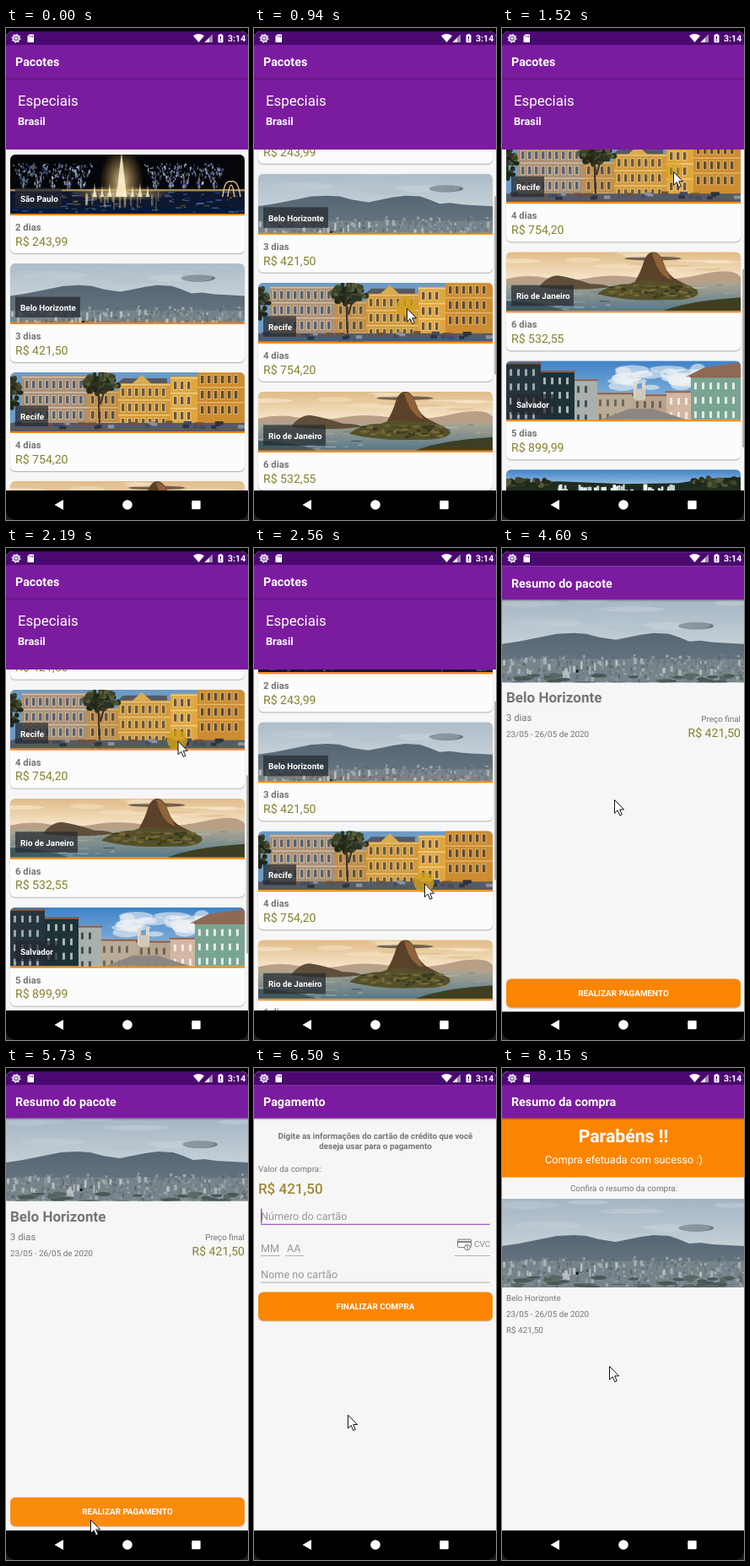
Animation, 287 px wide and 583 px high, one loop 8.17 s. Source, as an HTML page:

```html
<!DOCTYPE html>
<html lang="pt-BR">
<head>
<meta charset="utf-8">
<title>Pacotes</title>
<style>
html, body { margin: 0; width: 100%; height: 100%; overflow: hidden; background: #1c1c1c; }
svg#stage { display: block; width: 100vw; height: 100vh; }
text { font-family: Roboto, "Noto Sans", sans-serif; text-rendering: geometricPrecision; white-space: pre; }
</style>
</head>
<body>
<svg id="stage" viewBox="0 0 287 583" xmlns="http://www.w3.org/2000/svg"></svg>
<script>
const LOOP = 8170;
const PURPLE = '#7b1b9f', DARK = '#4a0a70', ORANGE = '#fb8500', GREY = '#757575', OLIVE = '#85802f', PAGE = '#f6f6f6';
const $ = id => document.getElementById(id);

// Markup helpers
const rect = (x, y, w, h, fill, more = '') => `<rect x="${x}" y="${y}" width="${w}" height="${h}" fill="${fill}" ${more}/>`;
const path = (d, fill, more = '') => `<path d="${d}" fill="${fill}" ${more}/>`;
const line = (d, stroke, w = 1, more = '') => path(d, 'none', `stroke="${stroke}" stroke-width="${w}" ${more}`);
const oval = (x, y, rx, ry, fill, more = '') => `<ellipse cx="${x}" cy="${y}" rx="${rx}" ry="${ry}" fill="${fill}" ${more}/>`;
const text = (x, y, s, size, fill, weight = 400, anchor = 'start') =>
  `<text x="${x}" y="${y}" font-size="${size}" fill="${fill}" font-weight="${weight}" text-anchor="${anchor}">${s}</text>`;
const stops = list => list.map((c, i) => `<stop offset="${i / (list.length - 1)}" stop-color="${c}"/>`).join('');
const grad = (id, ...list) => `<linearGradient id="${id}" x2="0" y2="1">${stops(list)}</linearGradient>`;
const many = (n, f) => Array.from({ length: n }, (_, i) => f(i)).join('');
let seed = 7;
const rnd = (a = 0, b = 1) => {
  seed = (seed * 16807) % 2147483647;
  return +(a + (b - a) * seed / 2147483647).toFixed(1);
};
const pick = list => list[Math.floor(rnd(0, list.length - .01))];
const photo = (id, w, h, body) => `<symbol id="${id}" viewBox="0 0 ${w} ${h}" preserveAspectRatio="xMidYMid slice">${body}</symbol>`;
const windows = (x, y, cols, rows, dx, dy, fill, w = 3, h = 6) =>
  many(cols * rows, i => rect(x + i % cols * dx, y + Math.floor(i / cols) * dy, w, h, fill));
const leaves = (x, y, rx, ry, n) => many(n, () => {
  const a = rnd(0, 6.3), r = Math.sqrt(rnd());
  return oval(x + rx * r * Math.cos(a), y + ry * r * Math.sin(a), rnd(2, 5), rnd(2, 4), pick(['#2c3320', '#3d452a', '#212718', '#565a35']));
});

// Softly drawn landscapes
const litTree = x => many(52, () => {
  const a = rnd(-1.4, 1.4), r = rnd(4, 32);
  return rect(x + r * .42 * Math.sin(a), 42 - r, rnd(.8, 2), rnd(1, 4), pick(['#3f5688', '#93a5c8', '#5f759f', '#cdd6e6', '#6d7488']), 'opacity=".8"');
}) + line(`M${x} 45V26`, '#aab4c8', .8);
const jet = (x, top, w) => path(`M${x - w} 50Q${x - w / 3} ${top + 14} ${x} ${top}Q${x + w / 3} ${top + 14} ${x + w} 50Z`, '#fff3cf', 'opacity=".85"');
const night = rect(0, 0, 278, 70, '#05060a') +
  [16, 32, 50, 68, 84, 172, 190, 206, 224, 242].map(litTree).join('') +
  oval(132, 32, 26, 40, 'url(#glow)') + rect(0, 42, 278, 28, '#0d1730') + rect(0, 41, 278, 2.4, '#a58a58') +
  many(110, () => rect(rnd(-4, 274), rnd(44, 68), rnd(2, 9), rnd(.7, 1.6), pick(['#2a4a86', '#5c5034', '#16264f', '#86713f', '#0a0f1e', '#4565a0']))) +
  oval(132, 46, 62, 9, 'url(#glow)') + many(24, () => rect(rnd(88, 178), rnd(44, 50), rnd(1, 3), rnd(6, 18), '#e6cd90', 'opacity=".4"')) +
  jet(132, -2, 6) + many(8, i => jet(100 + i * 9, 33 + i % 2 * 3, 3)) +
  line('M252 50Q254 29 262 32Q270 29 273 50M258 50Q262 22 266 50', '#e9c685', 1.4);

const hills = rect(0, 0, 287, 105, 'url(#haze)') +
  many(18, () => oval(rnd(0, 287), rnd(3, 38), rnd(14, 40), rnd(2, 5), pick(['#cfd6db', '#aebdc9', '#c4ced6']), 'opacity=".4"')) +
  path('M0 56L20 53L45 48L65 44L85 43L100 44L115 48L135 51L150 48L165 45L180 43L198 44L210 48L222 53L235 52L250 54L287 56V90H0Z', 'url(#ridge)') +
  rect(0, 74, 287, 31, '#76838a') +
  many(420, () => rect(rnd(-2, 286), rnd(68, 103), rnd(1, 4), rnd(1, 5), pick(['#95a0a6', '#7d898f', '#a9b1b4', '#66737a', '#58666b', '#8a9499']), 'opacity=".85"')) +
  many(40, () => rect(rnd(0, 284), rnd(72, 92), rnd(2, 4), rnd(5, 10), pick(['#a6afb3', '#87939a', '#b9bfc0']))) +
  many(40, () => oval(rnd(0, 287), rnd(92, 106), rnd(4, 11), rnd(1, 3), pick(['#4b5856', '#5a6763'])));

const facade = (x, y, w, wall, trim, win) => rect(x, y, w, 64 - y, wall) +
  many(3, i => rect(x, y + 1 + i * 18, w, 1.6, trim)) +
  windows(x + 3, y + 5, Math.floor((w - 3) / 8), 3, 8, 18, trim, 5.4, 11) +
  windows(x + 4, y + 6, Math.floor((w - 3) / 8), 3, 8, 18, win, 3.4, 9);
const town = rect(0, 0, 278, 70, '#6d9bc6') + facade(14, 4, 78, '#ad8f72', '#cbbfae', '#57616e') +
  facade(92, 22, 36, '#c08f48', '#d3b27c', '#5d5140') +
  path('M126 14L134 7H186V14Z', '#565964') + facade(128, 13, 62, '#d29a3c', '#e8c57c', '#6b573d') +
  path('M144 14L156 3L168 14Z', '#dbab51') +
  facade(190, 5, 32, '#e0a63f', '#f0cd84', '#695540') + facade(222, -2, 56, '#cd8c30', '#e2b568', '#5f4b38') +
  rect(0, 60, 278, 10, '#545a66') + many(26, () => rect(rnd(0, 270), rnd(57, 64), rnd(5, 11), 4, pick(['#2e333c', '#8f9299', '#6a5140', '#3f4c63']))) +
  leaves(3, 24, 9, 18, 40) + leaves(106, 13, 22, 12, 80) + line('M104 16L106 60M112 20L107 38', '#3b2e24', 2);

const bay = rect(0, 0, 278, 70, 'url(#dusk)') +
  many(14, () => oval(rnd(0, 278), rnd(2, 22), rnd(14, 40), rnd(1, 3), pick(['#fdf2de', '#dcb98a', '#f7e5c8']), 'opacity=".5"')) +
  path('M0 32Q25 26 48 31T104 30Q130 26 160 31T230 27T278 30V42H0Z', '#b99f86') +
  rect(0, 37, 278, 33, 'url(#water)') +
  many(70, () => rect(rnd(-8, 270), rnd(38, 68), rnd(4, 18), rnd(.6, 1.6), pick(['#c9c5b5', '#4f7080', '#a9a58f', '#6f858a']), 'opacity=".55"')) +
  path('M40 40Q50 28 61 28Q80 31 100 38Q118 38 124 42Q80 47 40 42Z', '#5f4e39') +
  path('M150 40Q160 24 164 9Q168 0 175 0Q183 1 187 14Q191 28 204 34L228 46Q180 54 146 47Z', '#5a4129') +
  path('M173 1Q184 2 187 16L196 33Q180 29 173 1Z', '#8f6238') +
  path('M108 50Q122 38 146 38Q164 30 186 36Q212 34 228 48Q226 58 190 57Q142 59 108 50Z', '#54502a') +
  many(60, () => oval(rnd(124, 218), rnd(40, 54), rnd(2, 6), rnd(1, 2), pick(['#42431f', '#68602f', '#7a6938', '#35381d']))) +
  path('M186 70Q216 58 278 54V70Z', '#3e3f22') + path('M0 70V58Q44 60 70 70Z', '#3f5a60');

const house = (x, y, w, fill, win) => rect(x, y, w, 70 - y, fill) + rect(x - 1, y, w + 2, 2, '#8f6048') +
  windows(x + 4, y + 8, Math.floor((w - 2) / 9), 4, 9, 17, win, 3, 8);
const street = rect(0, 0, 278, 70, 'url(#day)') +
  many(22, () => oval(rnd(130, 240), rnd(8, 34), rnd(9, 24), rnd(3, 7), '#f1f4f6', 'opacity=".6"')) +
  house(106, 38, 46, '#b9ab95', '#6f665b') + house(150, 40, 48, '#b7a48e', '#716152') +
  rect(151, 25, 4, 20, '#dcd7cc') + rect(161, 25, 4, 20, '#dcd7cc') + rect(153, 33, 11, 14, '#cfc8bb') +
  house(80, 22, 28, '#a9b0ae', '#3f4f52') + house(40, 12, 41, '#1c3236', '#aab5b3') + house(0, 2, 41, '#26343e', '#9da7ac') +
  house(190, 36, 31, '#d3b6a4', '#f2e9df') + house(219, 18, 60, '#78a592', '#e3ebe6') +
  path('M213 19L235 8L278 2V18Z', '#8e6a55') + path('M112 70L146 57H174L214 70Z', '#8b8681');

const falls = rect(0, 0, 278, 70, '#4b8fd6') + rect(0, 0, 278, 22, 'url(#day)') +
  path('M0 11L28 15L62 14L140 17L205 16L236 11L278 9V70H0Z', '#1f2b1f') +
  leaves(22, 16, 30, 4, 40) + leaves(248, 15, 30, 5, 40) +
  many(40, () => line(`M${rnd(58, 204)} ${rnd(17, 24)}v${rnd(24, 44)}`, pick(['#fff', '#dfe8ec', '#c2d1d8']), rnd(2, 5))) +
  oval(140, 68, 88, 9, '#e9eff1', 'opacity=".8"');

// Screens
const appBar = title => rect(0, 4, 287, 16, DARK) + rect(0, 20, 287, 39.6, PURPLE) +
  rect(0, 59.6, 287, 2.6, 'url(#shade)') + text(11, 45.4, title, 14.3, '#fff', 700);
const screen = (id, body, bar) => `<g id="${id}" clip-path="url(#clip-${id})"><g id="${id}-in">` +
  rect(0, 4, 287, 544, PAGE) + rect(0, 548, 287, 60, '#000') + body + bar + '</g></g>';
const button = (id, y, label) => rect(5, y + 1.2, 278, 34, '#000', 'rx="6" opacity=".2"') + rect(5, y, 278, 34, ORANGE, 'rx="6"') +
  rect(5, y, 278, 34, '#fff', `rx="6" id="${id}" opacity="0"`) + text(144, y + 20.4, label, 9.9, '#fff', 600, 'middle');
const view = (id, x, y, w, h) => `<use href="#${id}" x="${x}" y="${y}" width="${w}" height="${h}"/>`;

const trips = [
  ['São Paulo', '2 dias', '243,99', 'night', 44], ['Belo Horizonte', '3 dias', '421,50', 'hills', 66],
  ['Recife', '4 dias', '754,20', 'town', 28], ['Rio de Janeiro', '6 dias', '532,55', 'bay', 63],
  ['Salvador', '5 dias', '899,99', 'street', 42], ['Foz do Iguaçu', '1 dia', '289,90', 'falls', 62]
];
const card = ([city, days, price, img, w], i) => `<g transform="translate(5 ${150 + 129 * i})">` +
  rect(-.4, .8, 278.8, 117.6, '#000', 'rx="6" opacity=".1"') + rect(0, 1, 278, 117, '#000', 'rx="6" opacity=".16"') +
  rect(0, 0, 278, 117, '#fcfcfc', 'rx="6"') +
  `<g clip-path="url(#round)">${view(img, 0, 0, 278, 70)}${rect(0, 70, 278, 2, ORANGE)}</g>` +
  rect(6, 39.5, w + 11, 24.5, '#23292e', 'opacity=".72"') +
  text(12, 56, city, 9.9, '#fff', 600) + text(6, 90, days, 11.3, GREY, 600) + text(6, 107.7, 'R$ ' + price, 14.1, OLIVE) + '</g>';

const list = `<g clip-path="url(#listbox)"><g id="cards">${trips.map(card).join('')}</g>` +
  rect(285.2, 144, 1.8, 211, '#999', 'id="thumb"') + '</g>' + rect(0, 59, 287, 85, PURPLE) +
  text(14, 91.6, 'Especiais', 16.9, '#fff') + text(14, 115.2, 'Brasil', 12.7, '#fff', 700);

const detail = view('hills', 0, 59.6, 287, 98) + text(5, 181.6, 'Belo Horizonte', 17, GREY, 600) +
  text(5, 203.7, '3 dias', 11.3, GREY) + text(5, 222.7, '23/05 - 26/05 de 2020', 9.9, GREY) +
  text(283, 204, 'Preço final', 9.9, GREY, 400, 'end') + text(283, 222, 'R$ 421,50', 14.1, OLIVE, 400, 'end') +
  button('press1', 508.8, 'REALIZAR PAGAMENTO');

const HINT = '#979797';
const rule = (x, y, w, c = '#a6a6a6') => rect(x, y, w, .9, c);
const form = text(144, 83.8, 'Digite as informações do cartão de crédito que você', 9.9, GREY, 600, 'middle') +
  text(144, 95.6, 'deseja usar para o pagamento', 9.9, GREY, 600, 'middle') +
  text(5, 123, 'Valor da compra:', 9.9, GREY) + text(5, 149.4, 'R$ 421,50', 17, '#a08936', 500) +
  text(8, 180, 'Número do cartão', 12.7, HINT) + rect(8, 184.6, 272, 1.3, '#a35fbd') +
  rect(8, 166.5, 1.4, 17.5, '#9c45b5', 'id="caret"') +
  text(8, 217.5, 'MM', 12.7, HINT) + text(39, 217.5, 'AA', 12.7, HINT) + text(261, 212, 'CVC', 9.9, '#888') +
  rule(8, 222, 23) + rule(37, 222, 22) + rule(238, 222, 42) +
  rect(241.5, 203, 16, 9.5, 'none', 'rx="1.2" stroke="#777"') + rect(241.5, 205, 16, 1.8, '#777') +
  `<circle cx="253" cy="212.5" r="3.2" fill="${PAGE}" stroke="#777"/>` + line('M252 211.2l1.2-.7v4', '#777', .8) +
  text(8, 249.2, 'Nome no cartão', 12.7, HINT) + rule(8, 253.6, 272) + button('press2', 265.3, 'FINALIZAR COMPRA');

const done = rect(0, 59, 287, 70.6, ORANGE) + text(144, 88, 'Parabéns !!', 21.2, '#fff', 700, 'middle') +
  text(144.5, 112.6, 'Compra efetuada com sucesso :)', 12.7, '#fff', 400, 'middle') +
  text(144.5, 146, 'Confira o resumo da compra:', 9.9, GREY, 400, 'middle') + view('hills', 0, 155, 287, 105) +
  ['Belo Horizonte', '23/05 - 26/05 de 2020', 'R$ 421,50'].map((s, i) => text(5, 276 + 18.9 * i, s, 9.9, GREY)).join('');

const status = oval(12, 12.3, 4.6, 4.6, '#e9dcf0') + oval(12, 12.3, 2.6, 2.6, '#8a5aa3') + oval(12, 12.3, 1.3, 1.3, '#fff') +
  `<circle cx="12" cy="12.3" r="5" fill="none" stroke="#e9dcf0" stroke-width="1.2" stroke-dasharray="1.6 2.3"/>` +
  path('M27.5 7.5H33V17H25.5V9.8Z', '#fff') + line('M28.2 9v2M30 9v2M31.6 9v2', DARK, .7) +
  path('M222 9.2Q228.5 4.6 235 9.2L228.5 17Z', '#fff') + path('M245 7.3V17H235.5Z', '#a98bb9') + path('M241 11.5V17H235.5Z', '#fff') +
  rect(251.5, 8, 6, 9.2, '#fff', 'rx=".8"') + rect(253.2, 7, 2.6, 1.5, '#fff') + line('M254.5 10v3.4M254.5 14.3v1.3', DARK, 1.1) +
  text(263, 16, '3:14', 10.6, '#fff', 600);
const nav = path('M57.5 565L68 559V571Z', '#fff') + oval(144, 565, 5.8, 5.8, '#fff') + rect(220.3, 560, 10.4, 10.2, '#fff', 'rx="1"');

const ids = ['list', 'detail', 'form', 'done'];
$('stage').innerHTML = '<defs>' +
  grad('haze', '#a3b4c3', '#c3ced6', '#b7c4cd') + grad('ridge', '#566674', '#6a7984') + grad('dusk', '#e0bb88', '#f8e8cd', '#ecd2aa') +
  grad('water', '#aca692', '#54788a') + grad('day', '#3f82c8', '#a9cae4') +
  `<radialGradient id="glow"><stop stop-color="#ffe9b0" stop-opacity=".85"/><stop offset="1" stop-color="#d09a3c" stop-opacity="0"/></radialGradient>` +
  '<linearGradient id="shade" x2="0" y2="1"><stop stop-opacity=".28"/><stop offset="1" stop-opacity="0"/></linearGradient>' +
  '<clipPath id="body"><path d="M0 12Q0 4 9 4H278Q287 4 287 12V569Q287 583 273 583H14Q0 583 0 569Z"/></clipPath>' +
  '<clipPath id="listbox"><rect y="143" width="287" height="405"/></clipPath>' +
  '<clipPath id="round"><rect width="278" height="117" rx="6"/></clipPath>' +
  ids.map(id => `<clipPath id="clip-${id}"><rect id="cut-${id}" width="287" height="600"/></clipPath>`).join('') +
  photo('night', 278, 70, night) + photo('hills', 287, 105, hills) + photo('town', 278, 70, town) +
  photo('bay', 278, 70, bay) + photo('street', 278, 70, street) + photo('falls', 278, 70, falls) + '</defs>' +
  rect(0, 0, 287, 583, '#1c1c1c') + rect(0, 0, 287, 20, '#000') + '<g clip-path="url(#body)">' +
  screen('list', list, appBar('Pacotes')) + screen('detail', detail, appBar('Resumo do pacote')) +
  screen('form', form, appBar('Pagamento')) + screen('done', done, appBar('Resumo da compra')) + status + nav + '</g>' +
  '<g id="mouse">' + oval(-.5, -1, 12, 12, '#d2a01a', 'id="touch"') +
  path('M.5 .5V16.3L4.2 12.8L6.8 18.9L9.3 17.8L6.7 11.9H11.6Z', '#fff', 'stroke="#111" stroke-width="1" stroke-linejoin="round"') + '</g>';

// Motion: rows of [time, value, ...], joined by monotone curves
const mouse = [[160, 170, 583], [430, 178, 446], [940, 181, 332], [970, 182, 327], [990, 182, 327], [1520, 203, 170], [1720, 204, 150],
  [1900, 204, 150], [2560, 202, 397], [2710, 198, 440], [2740, 198, 440], [3540, 140, 315], [4060, 133, 298], [4840, 133, 298],
  [4960, 132, 290], [5500, 97, 543], [5650, 100, 535], [6220, 100, 535], [6500, 111, 411], [7020, 129, 277], [7050, 129, 275],
  [7780, 129, 275], [8150, 127, 353]];
const scroll = [[430, 0], [940, 106], [970, 110], [990, 110], [1520, 271.5], [1720, 320], [1900, 320], [2560, 73], [2710, 34], [2740, 34], [3500, 0]];
const touch = [[400, 0], [440, .8], [940, .8], [1520, .5], [1720, 0], [1900, 0], [1940, .8], [2700, .8], [2760, 0]];
const bar = [[420, 0], [470, .8], [3800, .8], [4060, 0]];
const glow1 = [[5720, 0], [5760, .25], [5880, .2], [5960, 0]];
const glow2 = [[7490, 0], [7520, .25], [7580, 0]];
const opens = [['detail', 4310, 425], ['form', 6200, 330], ['done', 7770, 380]];

function at(keys, t, c = 1) {
  const last = keys.length - 1;
  if (t <= keys[0][0]) return keys[0][c];
  if (t >= keys[last][0]) return keys[last][c];
  const i = keys.findIndex(k => k[0] > t) - 1;
  const slope = j => j < 0 || j >= last ? 0 : (keys[j + 1][c] - keys[j][c]) / (keys[j + 1][0] - keys[j][0]);
  const tan = j => { const a = slope(j - 1), b = slope(j); return a * b > 0 ? 2 * a * b / (a + b) : 0; };
  const d = keys[i + 1][0] - keys[i][0], u = (t - keys[i][0]) / d, v = 1 - u;
  return keys[i][c] * v * v * (1 + 2 * u) + keys[i + 1][c] * u * u * (1 + 2 * v) + d * u * v * (tan(i) * v - tan(i + 1) * u);
}

// cubic-bezier(.4, 0, .2, 1)
function ease(x) {
  let lo = 0, hi = 1, u = .5;
  for (let n = 0; n < 20; n++) {
    u = (lo + hi) / 2;
    if (1.2 * u * (1 - u) ** 2 + .6 * u * u * (1 - u) + u ** 3 < x) lo = u; else hi = u;
  }
  return 3 * u * u * (1 - u) + u ** 3;
}

const shift = (id, y) => $(id + '-in').setAttribute('transform', `translate(0 ${y})`);

function draw(t) {
  const s = at(scroll, t);
  $('cards').setAttribute('transform', `translate(0 ${-s})`);
  $('thumb').setAttribute('y', 144 + s * 404 / 774);
  $('thumb').setAttribute('opacity', at(bar, t));
  shift('list', 0);
  opens.forEach(([id, start, dur], i) => {
    const p = Math.min(1, Math.max(0, (t - start) / dur)), e = ease(p);
    $(id).setAttribute('display', t >= start ? 'inline' : 'none');
    $('cut-' + id).setAttribute('y', 4 + 555 * (1 - p) ** 5);
    shift(id, 24 * (1 - e));
    if (p > 0 && p < 1) shift(ids[i], -11 * e);
  });
  $('caret').setAttribute('opacity', t > 6800 && t < 7260 ? 0 : 1);
  $('press1').setAttribute('opacity', at(glow1, t));
  $('press2').setAttribute('opacity', at(glow2, t));
  $('touch').setAttribute('opacity', at(touch, t));
  $('mouse').setAttribute('display', t >= 160 ? 'inline' : 'none');
  $('mouse').setAttribute('transform', `translate(${at(mouse, t, 1)} ${at(mouse, t, 2)})`);
}

const begin = performance.now();
function tick() {
  draw((performance.now() - begin) % LOOP);
  requestAnimationFrame(tick);
}
tick();
</script>
</body>
</html>
```
